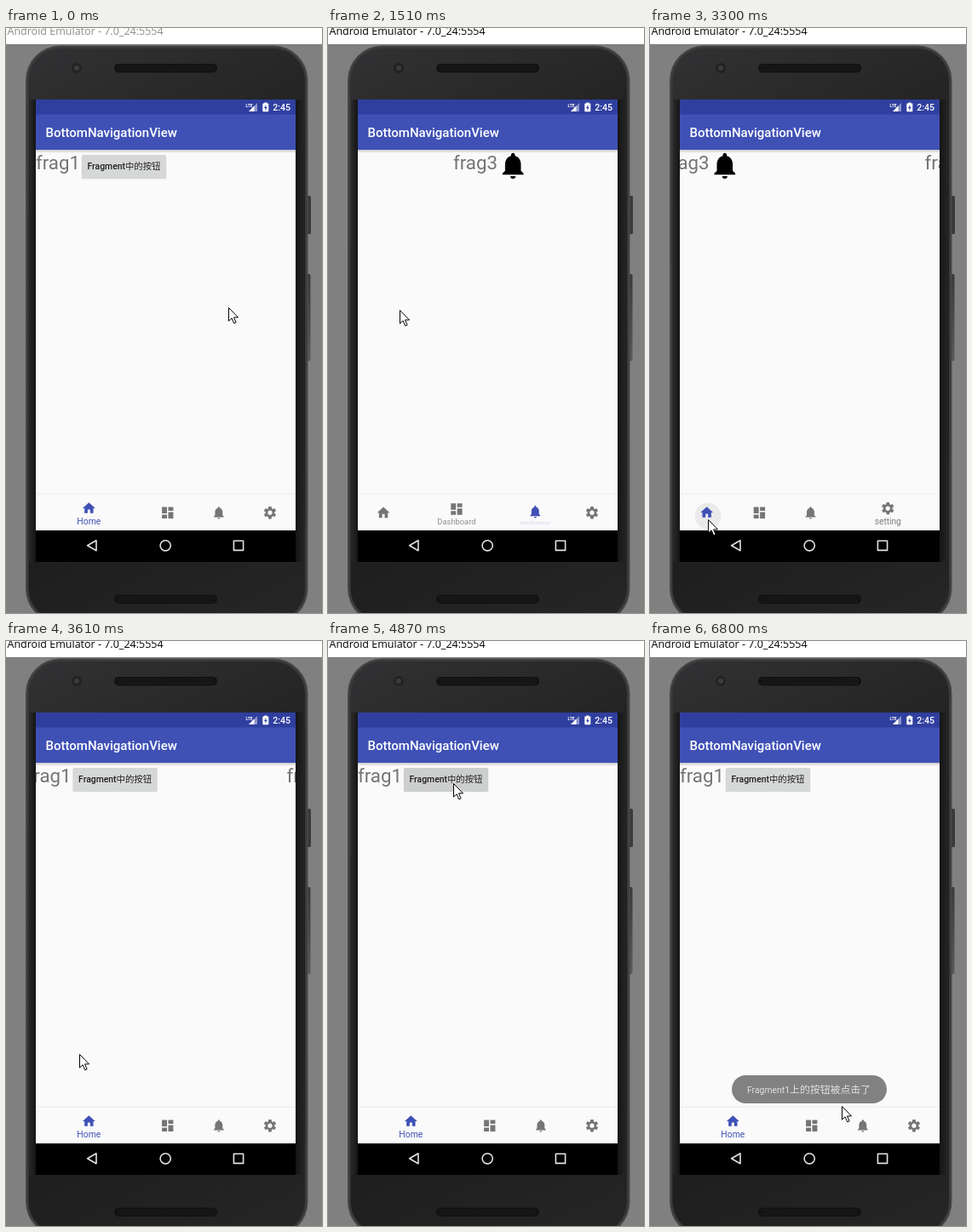
Write an HTML page with a canvas that moves like this. It is 371 px wide and 687 px high and loops after 6.88 s.

```html
<!DOCTYPE html>
<html lang="en">
<head>
<meta charset="utf-8">
<title>Bottom navigation demo</title>
<style>
html, body { margin: 0; width: 100%; height: 100%; overflow: hidden; background: #808080; }
canvas { display: block; width: 371px; height: 687px; }
</style>
</head>
<body>
<canvas id="stage"></canvas>
<script>
const W = 371, H = 687, LOOP = 6880, TICK = 77.8;
const canvas = document.getElementById('stage');
const ratio = window.devicePixelRatio || 1;
canvas.width = W * ratio;
canvas.height = H * ratio;
const ctx = canvas.getContext('2d');

const SANS = 'Roboto, "Noto Sans CJK SC", "Noto Sans CJK", sans-serif';
const PRIMARY = '#3f51b5', GREY = '#757575', PAPER = '#fafafa';
const SCREEN = { x: 35, y: 84, w: 305, h: 543 };

// Pointer gestures, each easing from wherever the last one ended
const MOVES = [
  { start: 30, end: 340, x: 295, y: 324 },
  { start: 410, end: 730, x: 190, y: 563 },
  { start: 810, end: 1210, x: 236, y: 302 },
  { start: 1290, end: 1505, x: 84, y: 331 },
  { start: 1540, end: 2100, x: 307, y: 573 },
  { start: 2600, end: 3070, x: 68, y: 577 },
  { start: 3310, end: 4300, x: 147, y: 167 },
  { start: 5260, end: 5730, x: 141, y: 329 },
  { start: 5950, end: 6180, x: 225, y: 546 }
];

// Page turns; the second one is the release of a swipe
const TURNS = [
  { at: 766, from: 0, to: 1, length: 200 },
  { at: 1452, from: 1.42, to: 2, length: 700 },
  { at: 2478, from: 2, to: 3, length: 200 },
  { at: 3259, from: 3, to: 0, length: 600 }
];
const TAB_DELAY = 28, TAB_LENGTH = 115;
const SWIPE = MOVES[3], RELEASE = TURNS[1], LAST_TAP = TURNS[3];

const clamp = v => Math.max(0, Math.min(1, v));
const smooth = v => { v = clamp(v); return v * v * (3 - 2 * v); };
const mix = (a, b, p) => a + (b - a) * p;

const snap = t => (Math.max(0, Math.floor(t / TICK - .29)) + .45) * TICK;

function pointerAt(t) {
  let x = 261, y = 328;
  for (const move of MOVES) {
    const p = smooth((t - move.start) / (move.end - move.start));
    x = mix(x, move.x, p);
    y = mix(y, move.y, p);
  }
  return { x, y };
}

function scrollAt(t) {
  if (t > SWIPE.start && t < RELEASE.at) return 1 + (MOVES[2].x - pointerAt(t).x) / SCREEN.w;
  const turn = TURNS.findLast(k => t >= k.at);
  if (!turn) return 0;
  return mix(turn.to, turn.from, Math.pow(1 - clamp((t - turn.at) / turn.length), 5));
}

function tabAt(t) {
  const turn = TURNS.findLast(k => t >= k.at + TAB_DELAY);
  if (!turn) return { from: 0, to: 0, p: 1 };
  return { from: Math.floor(turn.from), to: turn.to, p: smooth((t - turn.at - TAB_DELAY) / TAB_LENGTH) };
}

function gear() {
  const path = new Path2D();
  for (let k = 0; k < 6; k++) {
    const mid = k * Math.PI / 3 - Math.PI / 2;
    for (const [r, a] of [[7.1, -.38], [10, -.24], [10, .24], [7.1, .38]]) {
      path.lineTo(12 + r * Math.cos(mid + a), 12 + r * Math.sin(mid + a));
    }
  }
  path.closePath();
  path.moveTo(15.5, 12);
  path.arc(12, 12, 3.5, 0, Math.PI * 2);
  return path;
}

const BELL = new Path2D('M12 22c1.1 0 2-.9 2-2h-4c0 1.1.89 2 2 2zm6-6v-5c0-3.07-1.64-5.64-4.5-6.32V4c0-.83-.67-1.5-1.5-1.5s-1.5.67-1.5 1.5v.68C7.63 5.36 6 7.92 6 11v5l-2 2v1h16v-1l-2-2z');
const ITEMS = [
  ['Home', new Path2D('M10 20v-6h4v6h5v-8h3L12 3 2 12h3v8z')],
  ['Dashboard', new Path2D('M3 13h8V3H3zM3 21h8v-6H3zM13 21h8V11h-8zM13 3v6h8V3z')],
  ['Notifications', BELL],
  ['setting', gear()]
];

function rect(x, y, w, h, fill) {
  ctx.fillStyle = fill;
  ctx.fillRect(x, y, w, h);
}

function pill(x, y, w, h, r, fill) {
  ctx.beginPath();
  ctx.roundRect(x, y, w, h, r);
  ctx.fillStyle = fill;
  ctx.fill();
}

function disc(x, y, r, fill) {
  ctx.beginPath();
  ctx.arc(x, y, r, 0, Math.PI * 2);
  ctx.fillStyle = fill;
  ctx.fill();
}

function shape(d, x, y, fill, stroke) {
  const path = new Path2D(d);
  ctx.save();
  ctx.translate(x, y);
  ctx.fillStyle = fill;
  ctx.fill(path);
  if (stroke) {
    ctx.strokeStyle = stroke;
    ctx.lineWidth = 1;
    ctx.stroke(path);
  }
  ctx.restore();
}

function text(str, x, y, font, fill, align = 'left') {
  ctx.font = font;
  ctx.textAlign = align;
  ctx.fillStyle = fill;
  ctx.fillText(str, x, y);
}

function fade(x0, y0, x1, y1, ...stops) {
  const g = ctx.createLinearGradient(x0, y0, x1, y1);
  stops.forEach((c, i) => g.addColorStop(i / (stops.length - 1), c));
  return g;
}

function icon(path, cx, cy, size, fill) {
  ctx.save();
  ctx.translate(cx, cy);
  ctx.scale(size / 24, size / 24);
  ctx.translate(-12, -12);
  ctx.fillStyle = fill;
  ctx.fill(path, 'evenodd');
  ctx.restore();
}

function grille(y) {
  pill(127, y, 121, 10.5, 5, '#121212');
  for (let row = 0; row < 3; row++) {
    for (let x = 131 + row % 2 * 1.5; x < 245; x += 3) rect(x, y + 2 + row * 2.6, 1.2, 1.2, '#262626');
  }
}

function phone() {
  rect(0, 0, W, H, '#808080');
  rect(0, 0, W, 19, '#fff');
  pill(353, 197, 5, 45, 1.5, '#3a3a3a');
  pill(353, 289, 4.5, 102, 1.5, fade(0, 289, 0, 391, '#3a3a3a', '#5a5a5a'));
  pill(23, 20.5, 331.5, 679, 41, '#484848');
  pill(24.5, 22, 328.5, 676, 39.5, '#3a3a3b');
  pill(26.5, 24, 324.5, 672, 37.5, fade(26, 23, 351, 690, '#323234', '#202021', '#1c1c1c', '#262626'));
  rect(27, 84, 8, 543, fade(27, 0, 35, 0, '#2a2a2a', '#151515'));
  rect(340, 84, 10, 543, fade(340, 0, 350, 0, '#151515', '#252525'));
  disc(83, 47, 6, '#222223');
  disc(83, 47, 3, '#3c3c3f');
  grille(42);
  grille(665.5);
}

function appBar() {
  rect(35, 143, 305, 4, fade(0, 143, 0, 147, 'rgba(0,0,0,.2)', 'rgba(0,0,0,0)'));
  rect(35, 101, 305, 42, PRIMARY);
  text('BottomNavigationView', 46.5, 128, '500 15px ' + SANS, '#fff');

  rect(35, 84, 305, 17.5, '#303f9f');
  shape('M0 10L10 0V10z', 285, 88, '#8b94ca');
  shape('M0 10L6.5 3.5V10z', 285, 88, '#fff');
  text('LTE', 281.5, 92.5, '700 5px ' + SANS, '#fff');
  rect(303.3, 87.5, 3, 2, '#fff');
  pill(301.3, 88.6, 7, 9.6, .8, '#fff');
  shape('M2.3 0L0 4H1.5L1.2 7 3.7 3H2.2z', 303, 90, '#303f9f');
  text('2:45', 334, 97, '500 10.6px ' + SANS, '#fff', 'right');
}

function page(index, left, press) {
  const label = 'frag' + (index + 1);
  text(label, left, 166, '22.3px ' + SANS, GREY);
  if (index > 0) {
    icon(BELL, left + ctx.measureText(label).width + 18.2, 161.5, 37.2, '#000');
    return;
  }
  pill(left + 53.5, 149.5, 100, 28, 2, 'rgba(0,0,0,.07)');
  pill(left + 54, 149, 99, 28, 1.5, '#d6d7d7');
  pill(left + 54, 149, 99, 28, 1.5, `rgba(0,0,0,${.07 * press})`);
  text('Fragment中的按钮', left + 103.5, 166, '500 10.4px ' + SANS, '#212121', 'center');
}

function pages(t) {
  const scroll = scrollAt(t);
  const press = t >= 4700 ? 1 - clamp((t - 4700) / 390) : 0;
  for (let i = 0; i < 4; i++) page(i, SCREEN.x + (i - scroll) * SCREEN.w, press);
}

function itemCenter(i, selected) {
  const narrow = 60.1, wide = 124.7;
  if (i === selected) return 35 + narrow * i + wide / 2;
  return 35 + narrow * (i + .5) + (i > selected ? wide - narrow : 0);
}

function bottomBar(t) {
  rect(35, 548, 305, 42, PAPER);
  rect(35, 546, 305, 2, fade(0, 546, 0, 548, '#f7f7f7', '#ededed'));
  const since = t - LAST_TAP.at;
  if (since > 0) disc(68, 573, 14 + since / 30, `rgba(0,0,0,${.065 * clamp((260 - since) / 220)})`);
  const { from, to, p } = tabAt(t);
  ITEMS.forEach(([name, path], i) => {
    const x = mix(itemCenter(i, from), itemCenter(i, to), p);
    const on = i === to ? p : i === from ? 1 - p : 0;
    const color = i === to ? PRIMARY : GREY;
    icon(path, x, 569.2 - 5.3 * on, 17.8, color);
    ctx.globalAlpha = on;
    text(name, x, 582.7, `${10.4 * (.5 + .5 * on)}px ${SANS}`, color, 'center');
    ctx.globalAlpha = 1;
  });
}

function systemBar() {
  rect(35, 590, 305, 37, '#000');
  ctx.strokeStyle = '#e2e2e2';
  ctx.lineWidth = 1.6;
  ctx.lineJoin = 'round';
  ctx.stroke(new Path2D('M95.6 607.8l10.4-6v12z'));
  ctx.beginPath();
  ctx.arc(187.2, 607.8, 6.1, 0, Math.PI * 2);
  ctx.stroke();
  ctx.strokeRect(267.4, 602.2, 11.2, 11.2);
}

function toast(t) {
  ctx.globalAlpha = Math.min(clamp((t - 4860) / 230), clamp((6900 - t) / 120));
  pill(96, 510, 182, 33, 16.5, '#646464');
  text('Fragment1', 164, 530.5, '10.4px ' + SANS, '#f6f6f6', 'right');
  text('上的按钮被点击了', 164, 530.5, '11.9px ' + SANS, '#f6f6f6');
  ctx.globalAlpha = 1;
}

function pointer(t) {
  const { x, y } = pointerAt(t);
  ctx.lineJoin = 'miter';
  shape('M0 0V15.6L3.6 12.3 6.2 18.3 8.6 17.3 6 11.4H11z', Math.round(x) + .5, Math.round(y) + .5, '#fff', '#000');
}

function draw(t) {
  ctx.setTransform(ratio, 0, 0, ratio, 0, 0);
  phone();
  text('Android Emulator - 7.0_24:5554', 1.5, 8, '12.5px "Open Sans", "Noto Sans", sans-serif',
    t < TURNS[0].at ? '#8c8c8c' : '#000');

  ctx.save();
  ctx.beginPath();
  ctx.rect(SCREEN.x, SCREEN.y, SCREEN.w, SCREEN.h);
  ctx.clip();
  rect(SCREEN.x, SCREEN.y, SCREEN.w, SCREEN.h, PAPER);
  pages(t);
  appBar();
  bottomBar(t);
  systemBar();
  toast(t);
  ctx.restore();
  pointer(t);
}

const begin = performance.now();
function tick() {
  draw(snap((performance.now() - begin) % LOOP));
  requestAnimationFrame(tick);
}
tick();
</script>
</body>
</html>
```
